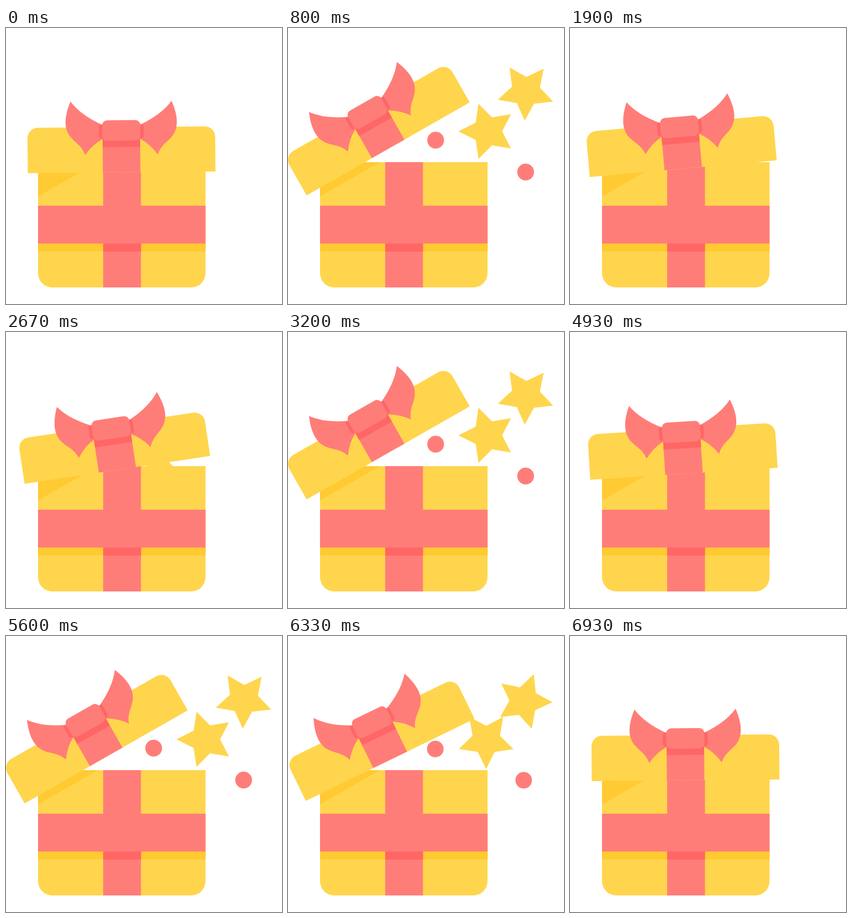
Write an HTML page with a canvas that moves like this. It is 500x500 px and loops after 7.16 s.

```html
<!DOCTYPE html>
<html lang="en">
<head>
<meta charset="utf-8">
<title>Gift box</title>
<style>
  html, body { margin: 0; width: 100%; height: 100%; overflow: hidden; background: #fff; }
  canvas { display: block; width: 100vmin; height: 100vmin; }
</style>
</head>
<body>
<canvas id="stage" width="500" height="500"></canvas>
<script>
const ctx = document.getElementById('stage').getContext('2d');
const YELLOW = '#ffd54d', AMBER = '#ffca32', PINK = '#ff7d78', RED = '#ff6666';
const LOOP = 7160, CYCLE = 2400, REST = 2130;
const HOME = { x: 230, y: 280 };

const ease = u => (1 - Math.cos(Math.PI * Math.min(1, Math.max(0, u)))) / 2;
const rise = (t, start, length) => ease((t - start) / length);
const mix = (a, b, k) => a + (b - a) * k;

function rect(color, x, y, w, h, radii = 0) {
  ctx.fillStyle = color;
  ctx.beginPath();
  ctx.roundRect(x, y, w, h, radii);
  ctx.fill();
}

function drawBase() {
  rect(YELLOW, 58, 243, 303.5, 227, [0, 0, 26, 26]);
  ctx.fillStyle = AMBER;
  ctx.beginPath();
  ctx.moveTo(58, 243);
  ctx.lineTo(167, 243);
  ctx.lineTo(58, 305);
  ctx.fill();
  rect(AMBER, 58, 390, 303.5, 15);
  rect(PINK, 176, 243, 68.5, 227);
  rect(RED, 176, 390, 68.5, 15);
  rect(PINK, 58, 322, 303.5, 68.5);
}

function drawWing(side) {
  ctx.save();
  ctx.scale(side, 1);
  ctx.fillStyle = PINK;
  ctx.beginPath();
  ctx.moveTo(34, -86);
  ctx.quadraticCurveTo(73, -104, 91.6, -129);
  ctx.bezierCurveTo(104.4, -98.6, 103.2, -78.6, 92, -64.7);
  ctx.bezierCurveTo(82, -52.8, 72, -49, 65.8, -32);
  ctx.quadraticCurveTo(52, -51, 34, -60.5);
  ctx.fill();
  rect(RED, 30, -87, 10.5, 25, 4);
  ctx.restore();
}

function drawLid(open) {
  const turn = 30.1 * open;
  ctx.save();
  ctx.translate(209.5 - 0.961 * turn, 261.5 - 1.458 * turn);
  ctx.rotate(-(turn + 0.51) * Math.PI / 180);
  rect(YELLOW, -170, -82, 340, 82, [19, 19, 0, 0]);
  rect(PINK, -34, -82, 68, 82);
  rect(RED, -34, -70, 68, 24);
  drawWing(1);
  drawWing(-1);
  rect(PINK, -34.5, -94.5, 69, 37, 9);
  ctx.restore();
}

// Moves a piece of confetti between the box and its outer place.
function fling(x, y, out, turn, shape) {
  const size = mix(0.3, 1, out);
  ctx.save();
  ctx.translate(mix(HOME.x, x, out), mix(HOME.y, y, out));
  ctx.rotate(turn * Math.PI / 180);
  ctx.scale(size, size);
  ctx.beginPath();
  shape();
  ctx.fill();
  ctx.restore();
}

function star() {
  for (let i = 0; i < 10; i++) {
    const r = i % 2 ? 26.5 : 52.6, a = i * Math.PI / 5;
    ctx.lineTo(r * Math.cos(a), r * Math.sin(a));
  }
}

const dot = () => ctx.arc(0, 0, 15.2, 0, 2 * Math.PI);

function drawConfetti(t) {
  const out = rise(t, 60, 610) - rise(t, 1470, 750);
  if (out <= 0) return;
  const tumble = 9.2 - 1.26e-4 * (t - 1070) ** 2;
  ctx.fillStyle = YELLOW;
  fling(430.8, 115.2, out, 20 + tumble, star);
  fling(361.4, 187.2, out, 180 + tumble, star);
  ctx.fillStyle = PINK;
  fling(267.5, 203.3, out, 0, dot);
  fling(430.5, 261, out, 0, dot);
}

// Time within the opening cycle, held on the animation's frame steps.
function cycleTime(time) {
  const step = time < CYCLE ? 100 / 3 : 200 / 3;
  const t = Math.floor((time % CYCLE + 4) / step) * step;
  return time < 100 || t >= REST ? -100 : t;
}

function draw(now) {
  const t = cycleTime(now % LOOP);
  ctx.fillStyle = '#fff';
  ctx.fillRect(0, 0, 500, 500);
  drawConfetti(t);
  drawBase();
  drawLid(rise(t, -73, 984) - rise(t, 1339, 753));
  requestAnimationFrame(draw);
}
requestAnimationFrame(draw);
</script>
</body>
</html>
```
